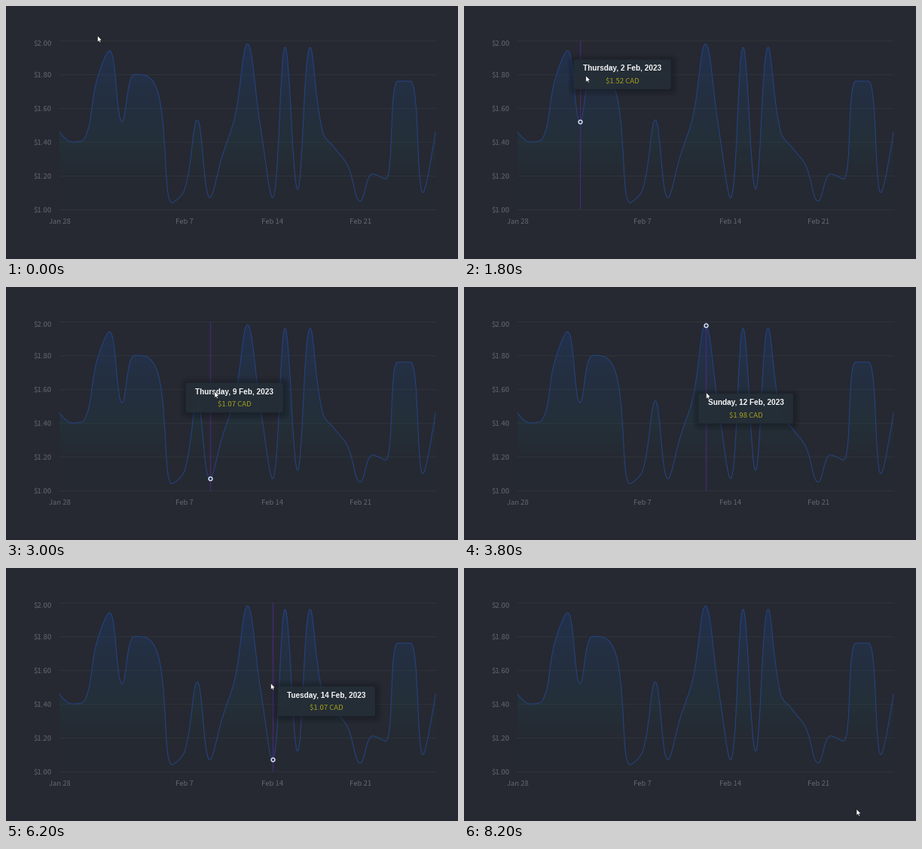
A matplotlib script that plays this animation: 600 by 337 pixels, repeating every 8300 ms.

```python
import numpy as np
import matplotlib.pyplot as plt
from matplotlib.animation import FuncAnimation
from matplotlib.colors import LinearSegmentedColormap
from matplotlib.patches import FancyBboxPatch, PathPatch, Polygon
from matplotlib.path import Path

W, H, DPI = 600, 337, 100
FRAMES, STEP = 83, 100
PX = 72 / DPI
LEFT, RIGHT, TOP, BOTTOM = 70.4, 569.6, 45.6, 270.5
BG = "#262931"
GRAY = "#63666b"

# daily price in cents, from 28 January on
CENTS = np.array([146, 140, 142, 177, 194, 152, 180, 179, 165, 104, 112,
                  153, 107, 132, 155, 198, 151, 107, 196, 112, 196,
                  146, 136, 126, 105, 121, 118, 176, 176, 110, 146])
LAST = len(CENTS) - 1
DAYS = ["Saturday", "Sunday", "Monday", "Tuesday", "Wednesday",
        "Thursday", "Friday"]

# pointer stops: time in ms, x, y
STOPS = np.array([(0, 121, 39), (500, 131, 61), (1400, 131, 61),
                  (2300, 222.5, 137), (3800, 321, 140), (5000, 351, 153),
                  (6200, 351, 153), (7200, 484, 236), (8200, 520.5, 320.5)])


def slopes(t, v):
    """Monotone tangents: zero at rests and turns."""
    d = np.diff(v) / np.diff(t)
    a, b = d[:-1], d[1:]
    same = a * b > 0
    inner = np.where(same, 2 * a * b / np.where(same, a + b, 1), 0)
    return np.concatenate([[0], inner, [0]])


def ease_through(t, keys, v):
    i = np.clip(np.searchsorted(keys, t, side="right") - 1, 0, len(keys) - 2)
    m, h = slopes(keys, v), keys[i + 1] - keys[i]
    u = (t - keys[i]) / h
    return (v[i] + (v[i + 1] - v[i]) * u * u * (3 - 2 * u)
            + h * u * (1 - u) * (m[i] * (1 - u) - m[i + 1] * u))


def in_chart(p):
    return TOP < p[1] < BOTTOM


def chase(path, start=(395, 122), gap=(9, 4.3), width=140):
    """Tooltip that trails the pointer, more slowly the faster it moves."""
    pos, trail = np.array(start, float), []
    for prev, p in zip(np.vstack([path[:1], path]), path):
        if in_chart(p):
            goal = p + gap
            if goal[0] + width > RIGHT:
                goal[0] = p[0] - gap[0] - width
            speed = np.hypot(*(p - prev))
            pos = pos + (goal - pos) * min(0.6, 1.2 / max(speed, 1))
        trail.append(pos)
    return trail


times = np.arange(FRAMES) * STEP
pointer = np.column_stack([ease_through(times, STOPS[:, 0], STOPS[:, k])
                           for k in (1, 2)])
tooltip = chase(pointer)


def price_y(cents):
    return BOTTOM - (cents - 100) / 100 * (BOTTOM - TOP)


def day_label(i):
    date = f"{28 + i} Jan" if i < 4 else f"{i - 3} Feb"
    return f"{DAYS[i % 7]}, {date}, 2023"


def smooth_path(pts, tension=0.4):
    """Cubic curve whose handles never overshoot the neighbouring points."""
    handles = [(pts[0], pts[0])]
    for a, p, b in zip(pts, pts[1:], pts[2:]):
        da, db = np.hypot(*(p - a)), np.hypot(*(b - p))
        out = p + (b - a) * tension * db / (da + db)
        out = np.clip(out, np.minimum(p, b), np.maximum(p, b))
        into = p - (out - p) * da / db
        into = np.clip(into, np.minimum(a, p), np.maximum(a, p))
        handles.append((into, p + (p - into) * db / da))
    handles.append((pts[-1], pts[-1]))
    verts = [pts[0]]
    for i in range(1, len(pts)):
        verts += [handles[i - 1][1], handles[i][0], pts[i]]
    return verts, [Path.MOVETO] + [Path.CURVE4] * (len(verts) - 1)


fig = plt.figure(figsize=(W / DPI, H / DPI), dpi=DPI, facecolor=BG)
ax = fig.add_axes([0, 0, 1, 1])
ax.axis("off")


def label(x, y, s, size, color, ha="center", font="Noto Sans CJK JP", **kw):
    return ax.text(x, y, s, fontsize=size * PX, color=color, ha=ha,
                   va="baseline", family=font, **kw)


# grid and axis labels
for cents in range(100, 201, 20):
    y = price_y(cents)
    ax.plot([LEFT, RIGHT], [y, y], color="#2e343a", lw=PX, zorder=1)
    label(60, max(y, 49.5) + 3.5, f"${cents / 100:.2f}", 9.6, GRAY, "right")
xs = np.linspace(LEFT, RIGHT, LAST + 1)
for i, s in ((0, "Jan 28"), (10, "Feb 7"), (17, "Feb 14"), (24, "Feb 21")):
    label(xs[i], 289.2, s, 9.5, GRAY)
ax.plot([-1, W], [336, 336], color="#15171b", lw=PX)

# area and line
pts = np.column_stack([xs, price_y(CENTS)])
verts, codes = smooth_path(pts)
area = PathPatch(
    Path(verts + [(RIGHT, BOTTOM), (LEFT, BOTTOM), verts[0]],
         codes + [Path.LINETO] * 2 + [Path.CLOSEPOLY]),
    fc="none", ec="none")
ax.add_patch(area)
shade = LinearSegmentedColormap.from_list(
    "shade", [(0, "#1c40865c"), (0.62, "#203f4a48"), (1, "#26293100")])
fill = ax.imshow(np.linspace(0, 1, 225)[:, None], cmap=shade, aspect="auto",
                 extent=(LEFT, RIGHT, BOTTOM, TOP), zorder=2)
fill.set_clip_path(area)
ax.add_patch(PathPatch(Path(verts, codes), fc="none", ec="#25427f",
                       lw=1.1 * PX, zorder=3))
ax.set_xlim(-0.5, W - 0.5)
ax.set_ylim(H - 0.5, -0.5)

# hover parts
cross, = ax.plot([0, 0], [TOP, BOTTOM], color="#4a2a82", alpha=0.8,
                 lw=1.4 * PX, solid_capstyle="butt", zorder=4)
dot, = ax.plot([0], [0], "o", ms=4.9 * PX, mfc="#25376f", mec="#f2f4fa",
               mew=1.3 * PX, zorder=5)


def panel(color, alpha, z):
    p = FancyBboxPatch((0, 0), 1, 1, fc=color, ec="none", alpha=alpha,
                       zorder=z)
    return ax.add_patch(p)


GLOW = range(9, -1, -1)
shadow = [panel("#10141a", 0.045, 6) for _ in GLOW]
box = panel("#252f38", 0.92, 7)
title = label(0, 0, "", 10, "#f4f5f6", font="Liberation Sans",
              weight="bold", zorder=8)
value = label(0, 0, "", 9.6, "#a39f1c", zorder=8)
hover = [cross, dot, *shadow, box, title, value]

ARROW = np.array([(0, 0), (0, 8.6), (1.9, 6.9), (3.1, 9.5), (4.5, 8.9),
                  (3.4, 6.3), (5.9, 6.1)])
arrow = ax.add_patch(Polygon(ARROW, fc="white", ec="#14161a", lw=0.6 * PX,
                             zorder=9))


def place(p, x, y, w, h, grow=0):
    p.set_bounds(x - grow, y - grow, w + 2 * grow, h + 2 * grow)
    p.set_boxstyle("round", pad=0, rounding_size=2 + grow)


def draw(n):
    tip = pointer[n]
    arrow.set_xy(ARROW + tip)
    shown = in_chart(tip)
    for part in hover:
        part.set_visible(shown)
    if shown:
        i = int(np.clip(np.rint((tip[0] - LEFT) / (xs[1] - xs[0])), 0, LAST))
        cross.set_xdata([xs[i]] * 2)
        dot.set_data([xs[i]], [pts[i, 1]])
        title.set_text(day_label(i))
        value.set_text(f"${CENTS[i] / 100:.2f} CAD")
        width = title.get_window_extent(fig.canvas.get_renderer()).width + 25
        x, y = tooltip[n]
        for p, g in zip(shadow, GLOW):
            place(p, x + 1, y + 1, width, 39.5, g)
        place(box, x, y, width, 39.5)
        title.set_position((x + width / 2, y + 15))
        value.set_position((x + width / 2, y + 31.7))
    return [*hover, arrow]


anim = FuncAnimation(fig, draw, frames=FRAMES, interval=STEP, repeat=True,
                     repeat_delay=0, blit=False)
plt.show()
```
